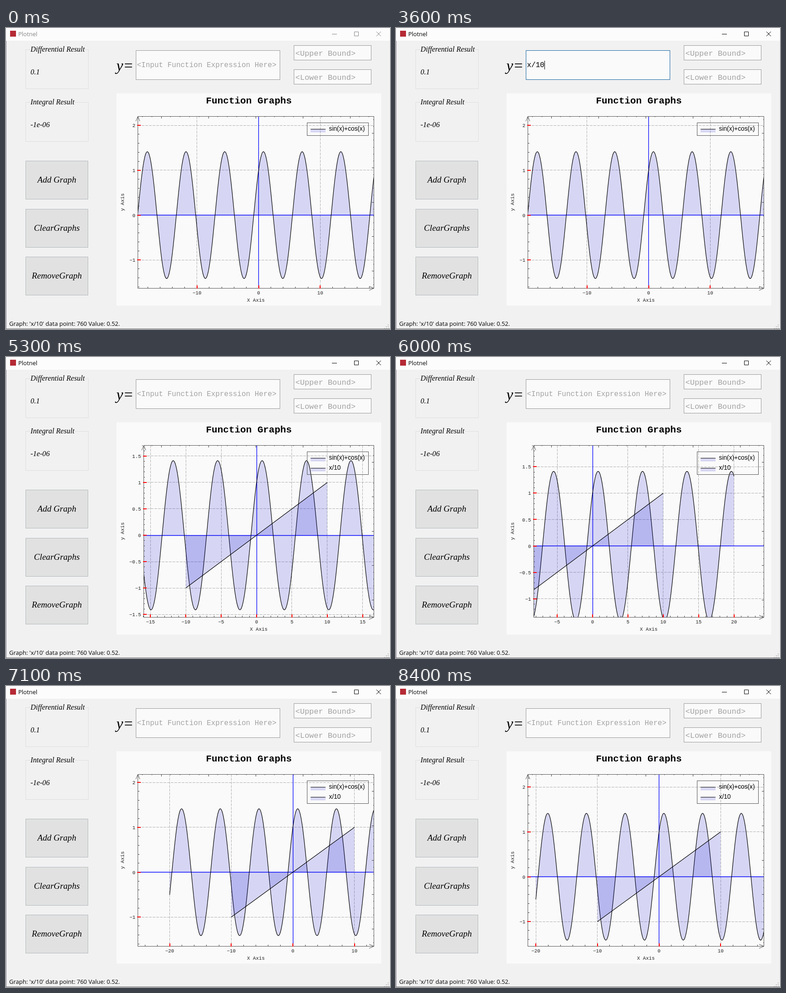
An HTML page that plays this animation: 846x662 px, repeating every 9.9 s.

```html
<!DOCTYPE html>
<html lang="en">
<head>
<meta charset="utf-8">
<title>Function plot window</title>
<style>
  html, body { margin: 0; width: 100%; height: 100%; overflow: hidden; background: #f1f1f1; }
  svg { display: block; }
  text { white-space: pre; }
  .ui { font: 13px "Open Sans", sans-serif; }
  .serif { font: italic 16.2px "Liberation Serif", serif; }
  .btn { font-size: 19.1px; text-anchor: middle; }
  .mono { font: 16px "Liberation Mono", monospace; }
  .bound { font-size: 17px; }
  .hint { fill: #a2a2a2; }
  .axis { font: 10.8px "Liberation Mono", monospace; fill: #222; }
  .legend { font: 13.75px "Liberation Sans", sans-serif; }
  .mid { text-anchor: middle; }
  .end { text-anchor: end; }
  .crisp { shape-rendering: crispEdges; }
  .box { fill: #fafafa; stroke: #999; }
  .group { fill: none; stroke: #dedede; }
  .button { fill: #e1e1e1; stroke: #b2b8ba; }
  .grid { stroke: #b0b0b0; stroke-dasharray: 6 2; }
  .zero { stroke: #00f; stroke-width: 1.3; }
  .frame { fill: none; stroke: #555; }
  .tick { stroke: #444; }
  .major { stroke: #f00; stroke-width: 2; }
  .area { fill: rgb(0 0 205 / .145); }
  .curve { fill: none; stroke: #000; stroke-width: 1.2; }
</style>
</head>
<body>
<svg width="846" height="662" viewBox="0 0 846 662">
  <rect width="846" height="662" fill="#f1f1f1"/>
  <rect width="846" height="28" fill="#fcfcfc"/>
  <path class="crisp" d="M.5 28V662" stroke="#9a8c9e"/>
  <path class="crisp" d="M0 661.5H846" stroke="#777"/>
  <rect x="9" y="6" width="13" height="13" fill="#b52a35"/>
  <g id="bar">
    <text class="ui" x="27" y="17.5">Plotnel</text>
    <path d="M718 13.5H729M767.5 8.5H776.5V17.5H767.5ZM816 8L826 18M826 8L816 18" fill="none" stroke="currentColor"/>
  </g>

  <path class="group crisp" d="M54 47.5H43.5V133.5H181.5V47.5H174M54 163.5H43.5V249.5H181.5V163.5H149"/>
  <g class="serif">
    <text x="54" y="51.5">Differential Result</text>
    <text x="54" y="101.5">0.1</text>
    <text x="54" y="167.5">Integral Result</text>
    <text x="54" y="217.5">-1e-06</text>
    <text x="243" y="94" font-size="34">y=</text>
  </g>

  <rect id="add" class="button crisp" x="43.5" y="292.5" width="137" height="84"/>
  <rect class="button crisp" x="43.5" y="398.5" width="137" height="84"/>
  <rect class="button crisp" x="43.5" y="503.5" width="137" height="84"/>
  <g class="serif">
    <text class="btn" x="112" y="340">Add Graph</text>
    <text class="btn" x="112" y="445.5">ClearGraphs</text>
    <text class="btn" x="112" y="551">RemoveGraph</text>
  </g>

  <rect id="field" class="box crisp" x="286.5" y="49.5" width="317" height="64"/>
  <rect class="box crisp" x="634.5" y="38.5" width="170" height="32"/>
  <rect class="box crisp" x="634.5" y="91.5" width="170" height="32"/>
  <text id="entry" class="mono" x="288.5" y="86"></text>
  <path id="caret" class="crisp" stroke="#000"/>
  <text class="mono bound hint" x="637.5" y="61">&lt;Upper Bound&gt;</text>
  <text class="mono bound hint" x="637.5" y="113.5">&lt;Lower Bound&gt;</text>

  <rect x="243.5" y="143.5" width="583" height="467" fill="#fafafa"/>
  <text class="mono mid" x="535" y="166" font-size="21" style="font-size:21px;font-weight:bold">Function Graphs</text>
  <clipPath id="clip"><rect id="clipBox" y="194" height="378"/></clipPath>
  <g id="plot"></g>

  <text class="ui" x="7" y="655">Graph: 'x/10' data point: 760 Value: 0.52.</text>
  <path d="M841 652h2v2h-2zM841 656h2v2h-2zM837 656h2v2h-2zM841 660h2v1h-2zM837 660h2v1h-2zM833 660h2v1h-2z" fill="#bbb"/>
</svg>
<script>
const LOOP = 9900, TOP = 194, BOTTOM = 572, RIGHT = 810.5, ZOOM = 0.85;
const $ = id => document.getElementById(id);

// time, origin x, origin y, wheel steps zoomed out
const VIEW = [
  [0, 556.5, 411.5, 4],
  [4300, 556.5, 383, 0],
  [5200, 555, 386, 1],
  [5300, 552, 392, 3],
  [5700, 552, 392, 3],
  [6000, 433, 415.5, 3],
  [6500, 644, 406, 3],
  [6900, 640, 408, 3],
  [7100, 632, 409.5, 4],
  [7600, 632, 409.5, 4],
  [7900, 447.5, 417, 4],
  [8400, 579.5, 419.5, 4]
];
const HINT = '<Input Function Expression Here>';
const TYPED = [[0, ''], [1600, 'x'], [2000, 'x/'], [2200, 'x/1'], [2600, 'x/10'], [4300, '']];
const CARET = [[0, 0], [500, 1], [900, 0], [1400, 1], [3100, 0], [3600, 1], [4100, 0]];
const BORDER = [[0, '#999'], [200, '#666'], [300, '#333'], [3400, '#2a4a68'],
  [3600, '#1563a0'], [3700, '#0078d7'], [4200, '#999']];
const BUTTON = [[0, '#e1e1e1', '#b2b8ba'], [3900, '#e2e6ea', '#7aa5c5'], [4000, '#e4ecf4', '#3d8ecd'],
  [4100, '#e5f1fb', '#0078d7'], [4200, '#cce4f7', '#005499'], [4300, '#e5f1fb', '#0078d7'],
  [4800, '#e4ecf4', '#3d8ecd'], [4900, '#e2e6ea', '#7aa5c5'], [5000, '#e1e1e1', '#b2b8ba']];

const at = (table, t) => table.findLast(row => row[0] <= t);

function viewAt(t) {
  const i = VIEW.findLastIndex(row => row[0] <= t);
  const a = VIEW[i], b = VIEW[i + 1];
  if (!b || a[3] !== b[3]) return a.slice(1);
  const u = (t - a[0]) / (b[0] - a[0]), e = u * u * (3 - 2 * u);
  return [a[1] + (b[1] - a[1]) * e, a[2] + (b[2] - a[2]) * e, a[3]];
}

const snap = v => Math.floor(v) + 0.5;
const path = (cls, d) => `<path class="${cls}" d="${d}"/>`;
const text = (cls, x, y, s, more = '') => `<text class="${cls}" x="${x}" y="${y}" ${more}>${s}</text>`;
const label = v => String(v).replace('-', '\u2212');

function graph(f, from, to, step, px, py) {
  const pts = [];
  const n = Math.round((to - from) / step);
  for (let i = 0; i <= n; i++) {
    const x = from + i * step;
    pts.push(px(x).toFixed(2) + ' ' + py(f(x)).toFixed(2));
  }
  const line = 'M' + pts.join('L');
  return path('area', `${line}L${px(to)} ${py(0)}L${px(from)} ${py(0)}Z`) + path('curve', line);
}

function fixedTicks() {
  let d = '';
  for (let i = -12; i <= 12; i++) {
    const len = i % 5 ? 2 : 5;
    d += `M${snap(550 + i * 20.8)} ${TOP}v${len}M${RIGHT} ${snap(383 + i * 15.12)}h${-len}`;
  }
  return d;
}

function drawPlot(x0, y0, zoom, both) {
  const wide = zoom < 4, left = wide ? 303 : 290.5;
  const stepX = wide ? 5 : 10, stepY = wide ? 0.5 : 1;
  const sx = (RIGHT - left) * ZOOM ** zoom / 20;
  const sy = (BOTTOM - TOP) * ZOOM ** zoom / 2;
  const px = x => x0 + x * sx, py = y => y0 - y * sy;
  let grid = '', zero = '', small = fixedTicks(), major = '', labels = '';

  for (let i = -60; i <= 60; i++) {
    const vx = i * stepX / 5, vy = i * stepY / 5;
    const x = px(vx), y = py(vy), gx = snap(x), gy = snap(y);
    const main = i % 5 === 0;
    if (x >= left - 0.5 && x < RIGHT - 0.5) {
      if (main) {
        const d = `M${gx} ${TOP}V${BOTTOM}`;
        if (i) grid += d; else zero += d;
        major += `M${Math.round(x)} 566V573`;
        labels += text('axis mid', x.toFixed(1), 586, label(vx));
      } else small += `M${gx} ${BOTTOM}v-3`;
    }
    if (y > TOP + 0.8 && y <= BOTTOM + 0.5) {
      if (main) {
        const d = `M${left} ${gy}H${RIGHT}`;
        if (i) grid += d; else zero += d;
        major += `M${left - 1.5} ${Math.round(y)}h8`;
        labels += text('axis end', left - 5.5, (y + 4).toFixed(1), label(vy));
      } else small += `M${left} ${gy}h3`;
    }
  }

  let curves = graph(x => Math.sin(x) + Math.cos(x), -20, 20, 0.1, px, py);
  if (both) curves += graph(x => x / 10, -10, 10, 20, px, py);

  const ax = snap(left);
  const legendRow = (y, s) => `<rect class="area" x="671" y="${y}" width="33" height="7"/>`
    + path('curve', `M671 ${y}H704`) + text('legend', 711.5, y + 3.5, s);
  const legend = `<rect class="frame crisp" x="663.5" y="208.5" width="135" height="${both ? 50 : 28}"/>`
    + legendRow(222.5, 'sin(x)+cos(x)') + (both ? legendRow(244.5, 'x/10') : '');

  $('clipBox').setAttribute('x', left);
  $('clipBox').setAttribute('width', RIGHT - left);
  $('plot').innerHTML = path('grid crisp', grid) + path('zero', zero)
    + `<g clip-path="url(#clip)">${curves}</g>`
    + path('frame crisp', `M${ax} 194.5H810.5V572.5H${ax}Z`)
    + path('tick crisp', small) + path('major crisp', major)
    + path('frame', `M${ax - 4.5} 205L${ax} 194.5L${ax + 4.5} 205M800 568L810.5 572.5L800 577`)
    + labels + legend
    + text('axis mid', (left + RIGHT) / 2, 602, 'X Axis')
    + text('axis mid', 0, 0, 'y Axis', 'transform="translate(260 383) rotate(-90)"');
}

let lastPlot = '';
function render(t) {
  const active = t >= 500;
  $('bar').style.color = active ? '#000' : '#858585';
  $('bar').style.fill = active ? '#000' : '#858585';

  const typed = at(TYPED, t)[1];
  $('entry').textContent = typed || HINT;
  $('entry').setAttribute('class', typed ? 'mono' : 'mono hint');
  $('caret').setAttribute('d', at(CARET, t)[1] ? `M${snap(289 + typed.length * 9.6)} 72V91` : '');
  $('field').style.stroke = at(BORDER, t)[1];
  const [, fill, stroke] = at(BUTTON, t);
  $('add').style.fill = fill;
  $('add').style.stroke = stroke;

  const view = [...viewAt(t), t >= 4300];
  if (view.join() !== lastPlot) {
    lastPlot = view.join();
    drawPlot(...view);
  }
}

const start = performance.now();
let lastStep = -1;
function tick() {
  // the screen refreshes in steps of 100 ms
  const step = Math.floor((performance.now() - start) % LOOP / 100);
  if (step !== lastStep) render((lastStep = step) * 100);
  requestAnimationFrame(tick);
}
tick();
</script>
</body>
</html>
```
